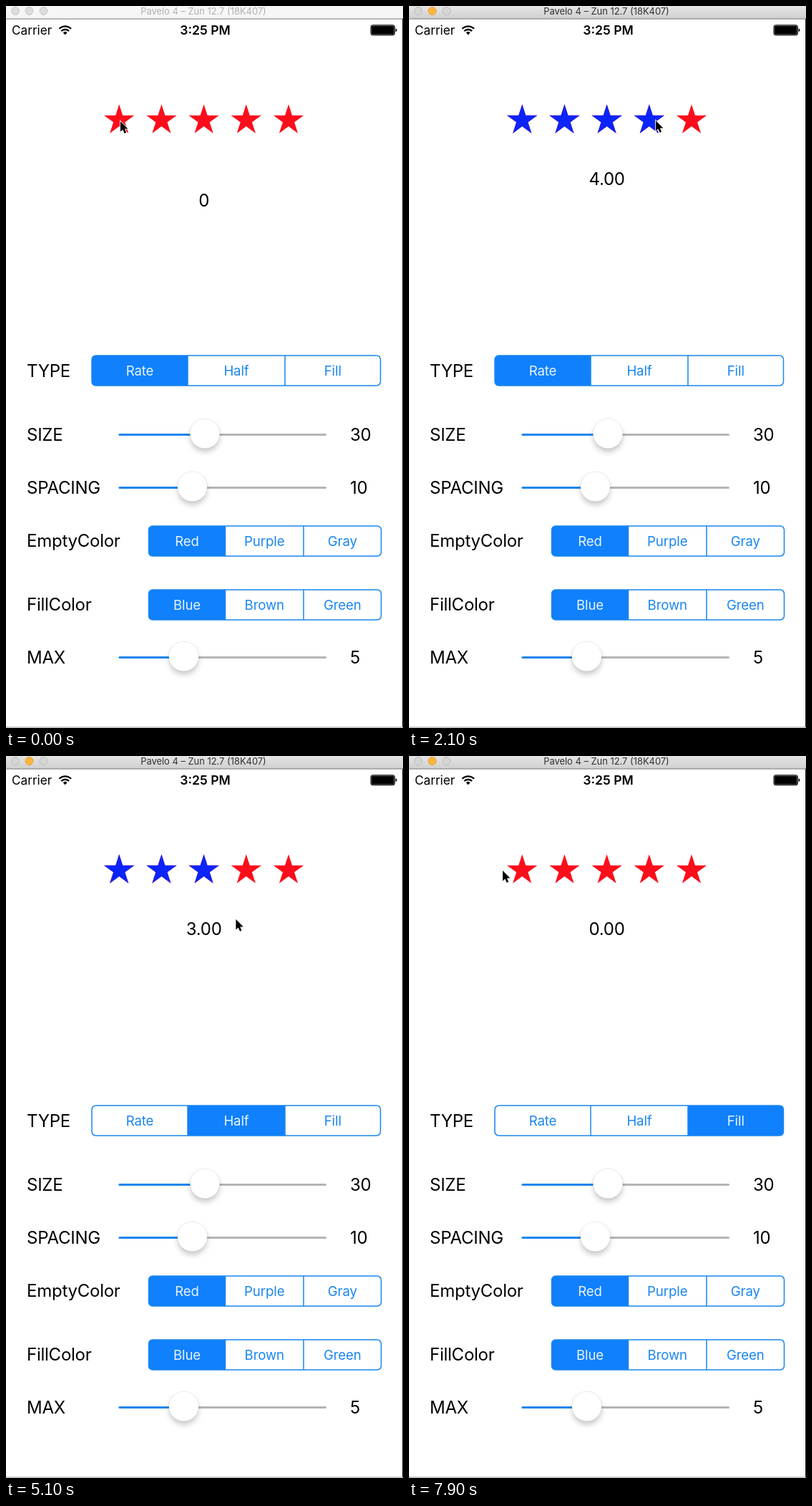
Write an HTML page that moves like this. It is 555 by 1008 pixels and loops after 8 s.

```html
<!DOCTYPE html>
<html lang="en">
<head>
<meta charset="utf-8">
<title>Star rating demo</title>
<style>
  html, body { margin: 0; width: 100%; height: 100%; overflow: hidden; background: #fff; }
  svg { display: block; width: 555px; height: 1008px; font-family: Inter, sans-serif; }
  .label { font-size: 24px; letter-spacing: -.25px; }
  .seg { font-size: 18.6px; letter-spacing: -.1px; }
  .mid { text-anchor: middle; }
  #light { --bar: url(#barOn); --ink: #303030; --dot: #d6d5d6; --rim: #bebdbe; --amber: #fdb63c; --amberRim: #e3a140; }
  #light.idle { --bar: #f6f6f6; --ink: #b1b1b1; --dot: #dcdcdc; --rim: #cacaca; --amber: #dcdcdc; --amberRim: #cacaca; }
  #bar { fill: var(--bar); }
  #name { fill: var(--ink); font-size: 12.9px; }
  .dot { fill: var(--dot); stroke: var(--rim); }
  .amber { fill: var(--amber); stroke: var(--amberRim); }
</style>
</head>
<body>
<svg id="stage" viewBox="0 0 555 1008">
  <defs>
    <linearGradient id="barOn" x2="0" y2="1">
      <stop stop-color="#e6e5e6"/><stop offset="1" stop-color="#d0cfd0"/>
    </linearGradient>
    <filter id="soft" x="-50%" y="-50%" width="200%" height="200%">
      <feGaussianBlur stdDeviation="4.5"/>
    </filter>
    <clipPath id="filled"><rect id="fillBox" x="130" y="130" height="60"/></clipPath>
  </defs>
  <rect width="555" height="1008" fill="#fff"/>
  <g id="light">
    <rect id="bar" width="555" height="18"/>
    <circle class="dot" cx="13" cy="7" r="5.5"/>
    <circle class="dot amber" cx="32.5" cy="7" r="5.5"/>
    <circle class="dot" cx="52.5" cy="7" r="5.5"/>
    <text id="name" class="mid" x="276" y="11.8">Pavelo 4 – Zun 12.7 (18K407)</text>
  </g>
  <path d="M0 18H555" stroke="#777"/>
  <path d="M554.5 18V1007" stroke="#222"/>
  <path d="M0 1007H555" stroke="#8e8e8e"/>

  <text x="8" y="40" font-size="17.2">Carrier</text>
  <g fill="none" stroke="#000" stroke-width="2.3">
    <path d="M74.4 31.8a11.6 11.6 0 0 1 16.6 0M77.3 35a7.6 7.6 0 0 1 10.8 0"/>
    <path d="M82.7 40.2l-2.8-3a4 4 0 0 1 5.6 0z" fill="#000" stroke="none"/>
  </g>
  <text class="mid" x="278.5" y="40" font-size="17.6" font-weight="600">3:25 PM</text>
  <rect x="510" y="26.7" width="33.4" height="14" rx="2.5" fill="#888" stroke="#000" stroke-width="1"/>
  <rect x="511.2" y="27.9" width="31" height="11.6" rx="1.2"/>
  <path d="M544.6 31.3q2 .8 2 2.4t-2 2.4z"/>

  <g id="empty" fill="#fc0d1b"></g>
  <g id="full" fill="#0b24fb" clip-path="url(#filled)"></g>
  <text id="score" class="label mid" x="276.6"></text>
  <g id="form"></g>
  <path id="cursor" d="M0 0V14.6L3.3 11.5 5.6 16.8 8.1 15.7 5.9 10.6H10.4Z"
        stroke="#fff" stroke-width="1.6" paint-order="stroke"/>
</svg>
<script>
const $ = id => document.getElementById(id);
const BLUE = '#1080fd', LINE = '#1a86ee', LEFT = 137.2, STAR = 42, PITCH = 59.2;
const LOOP = 8000, STEP = 100, FADE = 240;

const label = (x, mid, text) => `<text class="label" x="${x}" y="${mid + 8.8}">${text}</text>`;

function segments(id, top, edges, names) {
  const x = edges[0], w = edges[3] - x;
  const frame = `x="${x}" y="${top}" width="${w}" height="42" rx="5.5"`;
  const fills = names.map((_, i) =>
    `<rect class="fill" x="${edges[i]}" y="${top}" width="${edges[i + 1] - edges[i]}" height="42" fill="${BLUE}"/>`);
  const texts = names.map((name, i) =>
    `<text class="seg mid" x="${(edges[i] + edges[i + 1]) / 2}" y="${top + 27.5}">${name}</text>`);
  return `<g id="${id}"><clipPath id="${id}Clip"><rect ${frame}/></clipPath>
    <g clip-path="url(#${id}Clip)">${fills.join('')}</g>
    <g fill="none" stroke="${LINE}" stroke-width="1.5"><rect ${frame}/>
    <path d="M${edges[1]} ${top}v42M${edges[2]} ${top}v42"/></g>${texts.join('')}</g>`;
}

function slider(name, mid, knob, value) {
  const line = (from, to, color) =>
    `<path d="M${from} ${mid + .5}H${to}" stroke="${color}" stroke-width="3" stroke-linecap="round"/>`;
  return label(29, mid, name) + line(159, 446.5, '#b5b5b5') + line(159, knob, LINE) +
    `<circle cx="${knob}" cy="${mid + 4}" r="20" opacity=".24" filter="url(#soft)"/>
     <circle cx="${knob}" cy="${mid - 1}" r="20.8" fill="#fff" stroke="#000" stroke-opacity=".1" stroke-width=".7"/>` +
    label(481, mid, value);
}

function select(id, levels) {
  const fills = $(id).querySelectorAll('.fill'), texts = $(id).querySelectorAll('text');
  levels.forEach((level, i) => {
    fills[i].setAttribute('opacity', level);
    texts[i].setAttribute('fill', `color-mix(in srgb, #eaf4ff ${level * 100}%, ${LINE})`);
  });
}

function star(i) {
  const points = Array.from({ length: 10 }, (_, k) => {
    const r = k % 2 ? 8.5 : 22.3, a = k * Math.PI / 5;
    return [LEFT + STAR / 2 + i * PITCH + r * Math.sin(a), 159.6 - r * Math.cos(a)].map(n => n.toFixed(2));
  });
  return `<polygon points="${points.join(' ')}"/>`;
}

// Pointer path: time, x, y
const path = [
  [0, 160, 161], [700, 160, 160], [1000, 173, 158], [1100, 180, 157], [1700, 345, 160],
  [2100, 345, 160], [2600, 325, 500], [2710, 325, 500], [2900, 315, 317], [3150, 290, 200],
  [3600, 165, 158], [3900, 172, 156], [4100, 210, 155], [4700, 285, 158], [5000, 290, 160],
  [5500, 447, 500], [5620, 447, 500], [5800, 446, 470], [6500, 300, 190], [7100, 281, 166],
  [7150, 280, 166], [7900, 131, 160]
];
// Touches on the stars, and how each mode rounds
const drags = [
  { from: 600, to: 2000, round: Math.ceil },
  { from: 3700, to: 5000, round: v => Math.ceil(v * 2) / 2 },
  { from: 7150, to: LOOP, round: v => v }
];
const taps = [2710, 5620];

function pointer(t) {
  const i = path.findIndex(p => p[0] > t);
  if (i < 0) return path.at(-1).slice(1);
  const a = path[i - 1], b = path[i], k = (t - a[0]) / (b[0] - a[0]);
  return [a[1] + (b[1] - a[1]) * k, a[2] + (b[2] - a[2]) * k];
}

function rating(t) {
  const drag = drags.findLast(d => t >= d.from);
  if (!drag) return null;
  const u = (pointer(Math.min(t, drag.to))[0] - LEFT) / PITCH, n = Math.floor(u);
  const raw = n + Math.min(1, (u - n) * PITCH / STAR);
  return drag.round(Math.max(0, Math.min(5, raw)));
}

function modeLevels(t) {
  const levels = [1, 0, 0];
  taps.forEach((tap, i) => {
    if (t < tap) return;
    const p = Math.min(1, (t - tap) / FADE);
    levels[i] = 1 - p;
    levels[i + 1] = .35 + .65 * p;
  });
  return levels;
}

function draw(t) {
  const value = rating(t), v = value ?? 0, n = Math.floor(v);
  $('light').classList.toggle('idle', t < 300);
  $('fillBox').setAttribute('width', v ? LEFT - 130 + n * PITCH + (v - n) * STAR : 0);
  $('score').textContent = value === null ? '0' : v.toFixed(2);
  $('score').setAttribute('y', value === null ? 279.6 : 249.8);
  select('type', modeLevels(t));
  $('cursor').setAttribute('transform', `translate(${pointer(t).join(' ')})`);
}

$('empty').innerHTML = $('full').innerHTML = [0, 1, 2, 3, 4].map(star).join('');
$('form').innerHTML =
  label(29, 508.7, 'TYPE') + segments('type', 488, [120, 254, 390, 523.5], ['Rate', 'Half', 'Fill']) +
  slider('SIZE', 598, 278, 30) + slider('SPACING', 672, 260.5, 10) +
  label(29, 746.5, 'EmptyColor') + segments('bare', 726, [199.5, 306.5, 416, 524.5], ['Red', 'Purple', 'Gray']) +
  label(29, 835.5, 'FillColor') + segments('tint', 815, [199.5, 306.5, 416, 524.5], ['Blue', 'Brown', 'Green']) +
  slider('MAX', 909, 248.5, 5);
select('bare', [1, 0, 0]);
select('tint', [1, 0, 0]);

const start = performance.now();
function tick() {
  const t = (performance.now() - start) % LOOP;
  draw(Math.floor(t / STEP) * STEP);
  requestAnimationFrame(tick);
}
tick();
</script>
</body>
</html>
```
